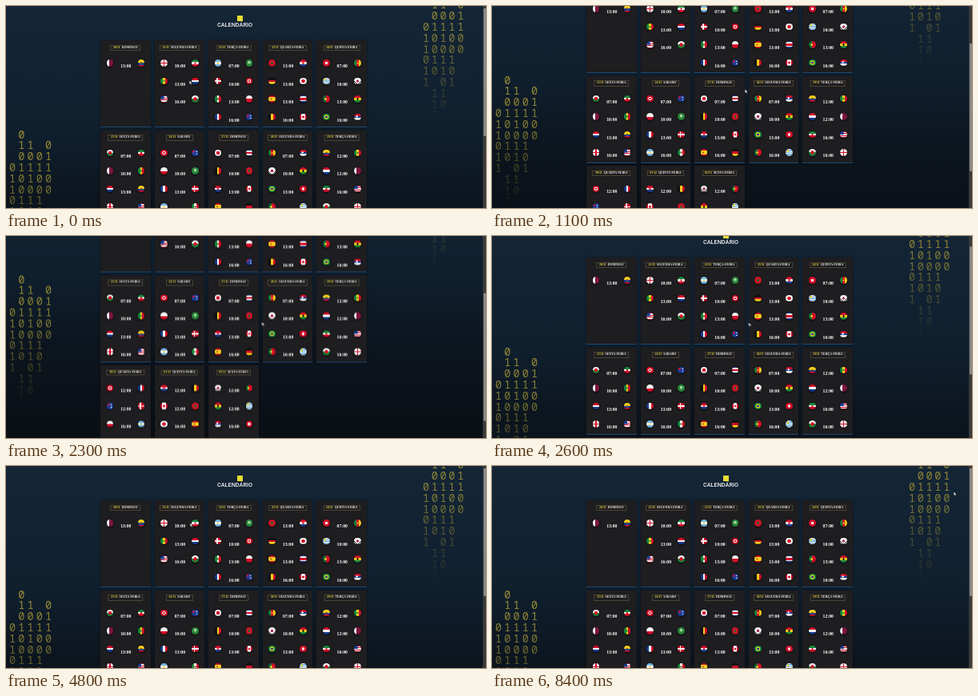
Animation of 600 by 253 pixels, one loop 8.5 s. Source, as an HTML page:

```html
<!DOCTYPE html>
<html lang="pt">
<head>
<meta charset="utf-8">
<title>Calendário</title>
<style>
html, body { margin: 0; width: 100%; height: 100%; overflow: hidden; background: #0b1017; }
#stage { position: relative; width: 600px; height: 253px; overflow: hidden; }
#stage div, #stage svg { position: absolute; }
#page {
  width: 600px; height: 392px;
  background: linear-gradient(#142536, #10202f 38%, #0c141d 65%, #0a0e13);
}
#mark { left: 289px; top: 12px; width: 7px; height: 7px; background: #e9dc35; }
#title {
  left: 186px; top: 18px; width: 200px; text-align: center; color: #f4f4f4;
  font: 500 7.3px/12px Roboto, sans-serif;
}
.digits {
  white-space: pre; color: #a09335;
  font: 13.5px/13.8px "Noto Sans Mono", monospace;
  -webkit-mask-image: linear-gradient(#000, #000c 35%, #0000);
  mask-image: linear-gradient(#000, #000c 35%, #0000);
}
.digits span { position: absolute; width: 12px; text-align: center; }
.card {
  width: 62.7px; height: 108px; background: #1e1d20;
  border-bottom: 1px solid #1f4a72; box-shadow: 0 0 2px #0008;
}
.day {
  left: 50%; top: 5.5px; transform: translateX(-50%); padding: 0 2.5px;
  border: 1px solid #4b4534; white-space: pre; color: #f2f2f2;
  font: bold 3.9px/5.6px "Liberation Serif", serif;
}
.day b { color: #e6d43c; }
.time {
  left: 11.8px; width: 40px; text-align: center; color: #fff;
  font: bold 5.7px/8px "Liberation Serif", serif;
}
.flag {
  width: 8.6px; height: 8.6px; border-radius: 50%;
  box-shadow: 0 .5px 2px #000, inset 0 -.6px 1px #0006;
}
#hover { animation: lift 8.5s -5ms infinite; }
#country {
  left: 220px; top: 96.5px; width: 30px; text-align: center; color: #bbb;
  font: 3px/4px "Liberation Serif", serif; animation: reveal 8.5s -5ms infinite;
}
#bar { right: 0; top: 0; width: 4px; height: 253px; background: #3a3a3a; }
#thumb { left: .5px; top: 3px; width: 3px; height: 160px; background: #8a8a8a; }
#arrow { left: 0; top: 0; }
#page { animation: scroll 8.5s -5ms infinite; }
#thumb { animation: thumb 8.5s -5ms infinite; }
#arrow { animation: point 8.5s -5ms infinite; }
</style>
</head>
<body>
<div id="stage">
  <div id="page">
    <div id="mark"></div>
    <div id="title">CALENDÁRIO</div>
  </div>
  <div id="bar"><div id="thumb"></div></div>
  <svg id="arrow" width="6" height="8" viewBox="0 0 6 8">
    <path d="M.3 .3V4.9L1.4 4 2.2 5.7 3 5.3 2.2 3.7H3.7Z" fill="#fff" stroke="#111" stroke-width=".4"/>
  </svg>
</div>
<script>
const DURATION = 8500;
const page = document.getElementById('page');

function add(parent, className, styles, html = '') {
  const el = document.createElement('div');
  el.className = className;
  Object.assign(el.style, styles);
  el.innerHTML = html;
  parent.append(el);
  return el;
}

// Flag painting: layers of CSS gradients, topmost first.
const bands = (angle, ...colors) => {
  const size = 100 / colors.length;
  return `linear-gradient(${angle}deg,${colors.map((c, i) => `${c} ${i * size}% ${(i + 1) * size}%`)})`;
};
const across = (...colors) => bands(90, ...colors);
const down = (...colors) => bands(180, ...colors);
const bar = (angle, color, from, to) =>
  `linear-gradient(${angle}deg,#0000 ${from}%,${color} ${from}% ${to}%,#0000 ${to}%)`;
const dot = (color, r, x = 50, y = 50) =>
  `radial-gradient(circle at ${x}% ${y}%,${color} ${r}px,#0000 ${r + .4}px)`;
const cross = (color, half, x = 50) =>
  [bar(90, color, x - half, x + half), bar(180, color, 50 - half, 50 + half)];
const canton = (color, w, h) => `linear-gradient(${color} 0 0) 0 0/${w}% ${h}% no-repeat`;

const red = '#d5102a', white = '#f3f3f3', green = '#178a3c', yellow = '#f7cf1d', blue = '#173f94', sky = '#76b9e8';
const flags = {
  qat: [across(white, '#7d1740', '#7d1740')],
  ecu: [dot('#7a5a30', 1), down(yellow, yellow, blue, red)],
  eng: [...cross(red, 10), down(white)],
  irn: [dot(red, .9), down(green, white, red)],
  sen: [dot(green, .9), across(green, yellow, red)],
  ned: [down(red, white, blue)],
  usa: [canton(blue, 52, 52), down(red, white, red, white, red, white, red)],
  wal: [dot(red, 2), down(white, green)],
  arg: [dot(yellow, .9), down(sky, white, sky)],
  ksa: [bar(180, '#e5f2e2', 65, 72), dot('#a9d6a9', 1.5, 50, 42), down('#2c8b3d')],
  den: [...cross(white, 9, 40), down(red)],
  tun: [dot(red, 1), dot(white, 2), down(red)],
  mex: [dot('#8a6a3a', 1), across(green, white, red)],
  pol: [down(white, red)],
  fra: [across(blue, white, red)],
  aus: [dot(white, .6, 70, 30), dot(white, .6, 72, 68), dot(red, 1.1, 28, 30), down('#1d3f9a')],
  mar: [dot('#1d6b35', 1.1), down('#cb1727')],
  cro: [dot('#e24a55', 1.3), down(red, white, blue)],
  ger: [down('#111', red, yellow)],
  jpn: [dot(red, 2), down(white)],
  esp: [dot('#a34a20', .8, 38), down(red, yellow, yellow, red)],
  crc: [down(blue, white, red, red, white, blue)],
  bel: [across('#111', yellow, red)],
  can: [dot(red, 1.2), across(red, white, white, red)],
  sui: [canton(white, 0, 0), dot(white, 1.5), down(red)],
  cam: [dot(yellow, .8), across(green, red, yellow)],
  uru: [dot(yellow, 1.1, 30, 30), down(white, sky, white, sky, white, sky, white)],
  kor: [dot('#b02c50', 1.4), bar(45, '#333', 20, 27), bar(135, '#333', 73, 80), down(white)],
  por: [dot(yellow, 1.1, 40), across('#16713a', '#16713a', red, red, red)],
  gha: [dot('#111', 1), down(red, yellow, green)],
  bra: [dot(blue, 1.2), dot(yellow, 2.4), down('#159040')],
  srb: [dot(white, 1, 40, 42), down(red, blue, white)],
};

const days = `20/11 DOMINGO|qat 13 ecu
21/11 SEGUNDA-FEIRA|eng 10 irn|sen 13 ned|usa 16 wal
22/11 TERÇA-FEIRA|arg 07 ksa|den 10 tun|mex 13 pol|fra 16 aus
23/11 QUARTA-FEIRA|mar 13 cro|ger 13 jpn|esp 13 crc|bel 16 can
24/11 QUINTA-FEIRA|sui 07 cam|uru 10 kor|por 13 gha|bra 16 srb
25/11 SEXTA-FEIRA|wal 07 irn|qat 10 sen|ned 13 ecu|eng 16 usa
26/11 SABADO|tun 07 aus|pol 10 ksa|fra 13 den|arg 16 mex
27/11 DOMINGO|jpn 07 crc|bel 10 mar|cro 13 can|esp 16 ger
28/11 SEGUNDA-FEIRA|cam 07 srb|kor 10 gha|bra 13 sui|por 16 uru
29/11 TERÇA-FEIRA|ecu 12 sen|ned 12 qat|irn 16 usa|wal 16 eng
30/11 QUARTA-FEIRA|tun 12 fra|aus 12 den|pol 16 arg|ksa 16 mex
01/12 QUINTA-FEIRA|cro 12 bel|can 12 mar|jpn 16 esp|crc 16 ger
02/12 SEXTA-FEIRA|kor 12 por|gha 12 uru|srb 16 sui|cam 16 bra`.split('\n');

days.forEach((line, i) => {
  const [heading, ...games] = line.split('|');
  const [date, name] = heading.split(' ');
  const card = add(page, 'card', {
    left: 118 + 67.6 * (i % 5) + 'px',
    top: 43 + 112.7 * Math.floor(i / 5) + 'px',
  });
  add(card, 'day', {}, `<b>${date}</b>  ${name}`);
  games.forEach((game, row) => {
    const [home, hour, away] = game.split(' ');
    const y = 28.5 + 22.5 * row;
    const flag = (team, x) => add(card, 'flag', {
      left: x - 4.3 + 'px', top: y - 4.3 + 'px', background: flags[team].join(),
    });
    flag(home, 12);
    const guest = flag(away, 51);
    if (i === 1 && row === 1) guest.id = 'hover';
    add(card, 'time', { top: y - .5 + 'px' }, hour + ':00');
  });
});
add(page, '', {}, 'HOLANDA').id = 'country';

const digitRows = [' 0', ' 11 0', ' 0001', '01111', '10100', '10000', '0111', '1010', '1 01', ' 11', ' 10', ' 1'];
function digits(x, y, columnStep) {
  const block = add(page, 'digits', { left: x - 6 + 'px', top: y - 7 + 'px', width: '60px', height: '166px' });
  block.innerHTML = digitRows.map((row, r) => [...row].map((d, c) =>
    `<span style="left:${c * columnStep}px;top:${r * 13.8}px">${d}</span>`).join('')).join('');
}
digits(8, 161.5, 11.25);
digits(525, -14.5, 10.8);

// Each segment advances in 100 ms steps.
function keyframes(name, points, css) {
  const rules = points.map(([t, ...values], i) => {
    const next = points[i + 1] || [t + 100];
    const steps = Math.max(1, Math.round((next[0] - t) / 100));
    return `${t / DURATION * 100}%{${css(...values)};animation-timing-function:steps(${steps})}`;
  });
  return `@keyframes ${name}{${rules.join('')}}`;
}
const scroll = [
  [0, 0], [500, 0], [800, 24], [1100, 68], [1400, 108], [1600, 117], [1800, 117], [2100, 139],
  [2200, 139], [2400, 74], [2600, 16], [2800, 0], [8500, 0],
];
const pointer = [
  [0, 229, 93], [600, 300, 101], [1100, 316, 104], [1600, 318, 106], [1800, 318, 106],
  [2100, 319, 107], [2600, 320.5, 108], [3000, 320.5, 108], [3200, 318, 107], [3500, 318, 107],
  [3900, 250, 85], [4000, 250, 85], [4300, 243, 76], [4500, 243, 76], [4800, 230, 71],
  [4900, 230, 71], [5200, 226, 76], [5400, 226, 76], [6300, 238.5, 95], [7200, 238.5, 95],
  [7500, 470, 62], [7600, 470, 62], [7900, 573, 38], [8200, 573, 38], [8400, 577, 32], [8500, 577, 32],
];
const hover = [[0, 0], [6200, 0], [6300, .4], [6600, .4], [6800, 1], [7200, 1], [7500, 0], [8500, 0]];

const sheet = document.createElement('style');
sheet.textContent = [
  keyframes('scroll', scroll, y => `transform:translateY(${-y}px)`),
  keyframes('thumb', scroll, y => `transform:translateY(${y * .645}px)`),
  keyframes('point', pointer, (x, y) => `transform:translate(${x}px,${y}px)`),
  keyframes('lift', hover, k => `transform:translate(${-k}px,${-3 * k}px)`),
  keyframes('reveal', hover, k => `opacity:${k}`),
].join('\n');
document.head.append(sheet);
</script>
</body>
</html>
```
